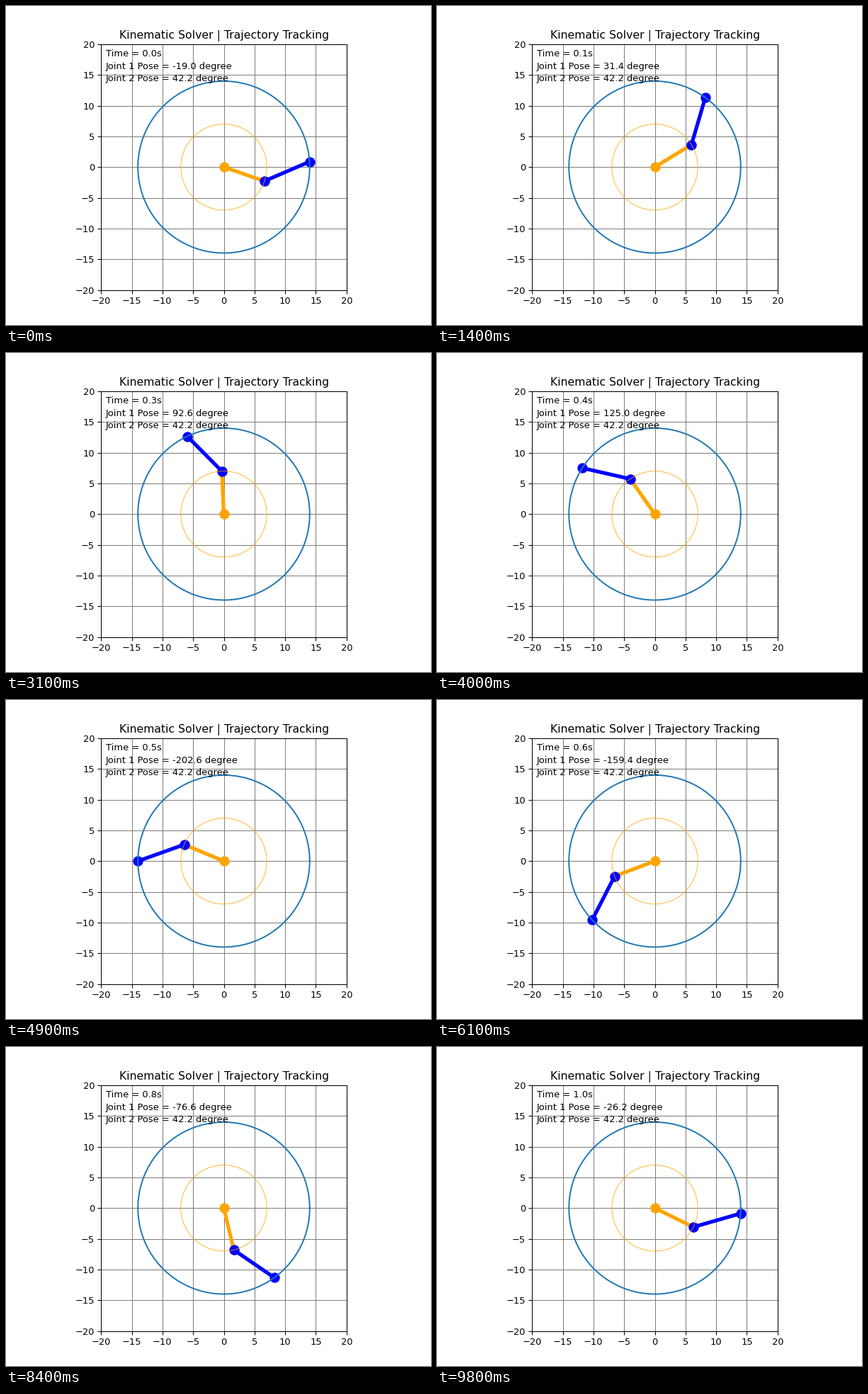
These frames come from a looping animation (600x450 px, 9.9 s). A matplotlib script:

```python
import numpy as np
import matplotlib.pyplot as plt
from matplotlib.animation import FuncAnimation

L1, L2 = 7, 8        # link lengths
RADIUS = 14          # radius of the tracked circle
STEPS = 100          # samples per turn
DT = 0.01


def solve(phi):
    """Joint angles that put the tip at angle phi on the tracked circle."""
    q2 = np.arccos((RADIUS**2 - L1**2 - L2**2) / (2 * L1 * L2))
    q1 = phi - np.arctan2(L2 * np.sin(q2), L1 + L2 * np.cos(q2))
    return q1, q2


def circle(radius, **style):
    a = np.linspace(0, 2 * np.pi, STEPS + 1)
    ax.plot(radius * np.cos(a), radius * np.sin(a), **style)


def label(y):
    return ax.text(0.02, y, "", transform=ax.transAxes)


plt.rcParams["font.family"] = "DejaVu Sans"
fig, ax = plt.subplots(figsize=(6.4, 4.8), dpi=93.75)
ax.set(xlim=(-20, 20), ylim=(-20, 20), aspect="equal")
ax.set_xticks(range(-20, 21, 5))
ax.set_yticks(range(-20, 21, 5))
ax.grid(color="gray", linewidth=0.8)
ax.set_title("Kinematic Solver | Trajectory Tracking")

arm1, = ax.plot([], [], "o-", color="orange", lw=4, markersize=10)
arm2, = ax.plot([], [], "o-", color="blue", lw=4, markersize=10)
circle(RADIUS, color="tab:blue", lw=1.5)
circle(L1, color="orange", lw=0.6)

time_text, joint1_text, joint2_text = (label(y) for y in (0.95, 0.90, 0.85))


def update(frame):
    step = frame + 1
    # the tip angle jumps from +180 to -180 degrees halfway round
    turn = step if step < STEPS / 2 else step - STEPS
    q1, q2 = solve(2 * np.pi * turn / STEPS)

    x1, y1 = L1 * np.cos(q1), L1 * np.sin(q1)
    x2, y2 = x1 + L2 * np.cos(q1 + q2), y1 + L2 * np.sin(q1 + q2)
    arm1.set_data([0, x1], [0, y1])
    arm2.set_data([x1, x2], [y1, y2])

    time_text.set_text(f"Time = {step * DT:.1f}s")
    joint1_text.set_text(f"Joint 1 Pose = {np.degrees(q1):.1f} degree")
    joint2_text.set_text(f"Joint 2 Pose = {np.degrees(q2):.1f} degree")
    return arm1, arm2, time_text, joint1_text, joint2_text


anim = FuncAnimation(fig, update, frames=STEPS - 1, interval=100,
                     repeat=True, repeat_delay=0, blit=False)
plt.show()
```
